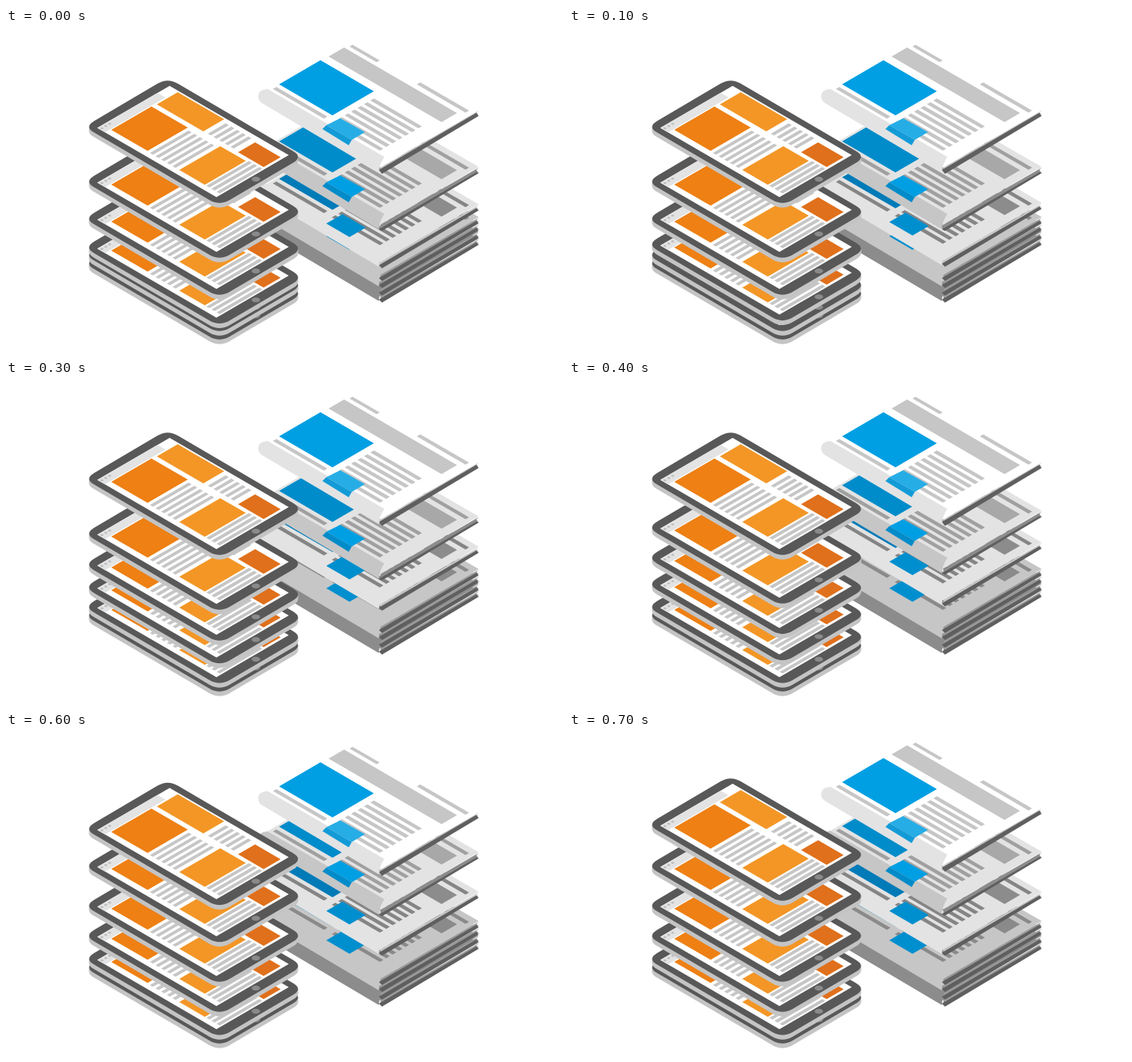
Write an HTML page with a canvas that moves like this. It is 720 px wide and 420 px high and loops after 0.8 s.

```html
<!DOCTYPE html>
<html lang="en">
<head>
<meta charset="utf-8">
<title>Tablets and newspapers</title>
<style>
html, body { margin: 0; width: 100%; height: 100%; overflow: hidden; background: #fff; }
canvas { display: block; }
</style>
</head>
<body>
<canvas id="stage" width="720" height="420"></canvas>
<script>
const ctx = document.getElementById('stage').getContext('2d');
const SLOPE = 0.582;
const STEP = 100;
const STEPS = 8;

// Each piece rises once per loop; times count in steps.
const tablets = [
  { low: 0, high: -16, start: 5, end: 9 },
  { low: 71, high: 45.5, start: 3, end: 5.7 },
  { low: 119, high: 97, start: 1.5, end: 5.2 },
  { low: 157, high: 136, start: -0.5, end: 4.5 }
];
const papers = [
  { low: 0, high: -16, start: 5, end: 9,
    page: '#ffffff', fold: '#e3e3e3', edge: '#c6c6c6', depth: 3, bar: '#c6c6c6',
    line: '#c6c6c6', photo: '#009fe3', box: '#27ade6', boxFold: '#139bd7' },
  { low: 74, high: 49, start: 2, end: 6.5,
    page: '#e3e3e3', fold: '#c6c6c6', edge: '#8c8c8c', depth: 6, bar: '#a8a8a8',
    line: '#a0a0a0', photo: '#008cca', box: '#009fe3', boxFold: '#008bc9' },
  { low: 122.5, high: 101, start: 0, end: 5.4,
    page: '#e3e3e3', fold: '#e3e3e3', edge: '#c6c6c6', depth: 4, bar: '#8c8c8c',
    line: '#858585', photo: '#007bb8', box: '#008fce' }
];
const still = { page: '#c6c6c6', fold: '#c6c6c6', edge: '#9a9a9a', depth: 4, bar: '#8a8a8a',
  line: '#8a8a8a', photo: '#007bb8', box: '#008fce' };
const stack = { page: '#8c8c8c', fold: '#8c8c8c', edge: '#9a9a9a', depth: 4 };

function lift({ low, high, start, end }, step) {
  const t = Math.min(1, Math.max(0, (step - start) / (end - start)));
  return low + (high - low) * t * t * (3 - 2 * t);
}

function poly(color, ...pts) {
  ctx.fillStyle = color;
  ctx.beginPath();
  for (let i = 0; i < pts.length; i += 2) ctx.lineTo(pts[i], pts[i + 1]);
  ctx.fill();
}

// Isometric block from its left corner: a runs down-right, b runs up-right.
function block(color, x, y, a, b) {
  poly(color, x, y, x + b, y - b * SLOPE,
    x + a + b, y + (a - b) * SLOPE, x + a, y + a * SLOPE);
}

function rows(color, count, x, y, dx, a, b) {
  for (let i = 0; i < count; i++) {
    block(color, x + dx * i, y + Math.abs(dx) * SLOPE * i, a, b);
  }
}

function dot(color, x, y, rx, ry) {
  ctx.fillStyle = color;
  ctx.beginPath();
  ctx.ellipse(x, y, rx, ry, 0, 0, Math.PI * 2);
  ctx.fill();
}

function at(dy, draw) {
  ctx.save();
  ctx.translate(0, dy);
  draw();
  ctx.restore();
}

function shell(color) {
  ctx.fillStyle = color;
  ctx.beginPath();
  ctx.moveTo(114, 120.4);
  ctx.lineTo(196, 72.1);
  ctx.quadraticCurveTo(209, 64.5, 222, 72.1);
  ctx.lineTo(371, 159.4);
  ctx.quadraticCurveTo(384, 167, 371, 174.7);
  ctx.lineTo(289, 222.9);
  ctx.quadraticCurveTo(276, 230.5, 263, 222.9);
  ctx.lineTo(114, 135.6);
  ctx.quadraticCurveTo(101, 128, 114, 120.4);
  ctx.fill();
}

function tablet() {
  for (let d = 6; d > 0; d--) at(d, () => shell('#c4c4c4'));
  shell('#585858');
  block('#ffffff', 118, 129.5, 154, 93.5);
  block('#e3e3e3', 118, 129.5, 10, 78);
  for (let i = 0; i < 3; i++) dot('#bdbdbd', 124 + 5 * i, 130 - 2.9 * i, 1.9, 1.3);
  block('#ee8014', 136, 132, 47, 52);
  block('#f39626', 195, 99, 60, 27);
  block('#f39626', 224, 184, 33, 53);
  block('#e0701b', 300, 161, 33, 22);
  rows('#c6c6c6', 5, 186, 162, 7.3, 4, 50);
  rows('#c6c6c6', 5, 261, 137, 7.3, 4, 23);
  rows('#c6c6c6', 3, 259, 204.5, 6.6, 4, 55);
  dot('#8a8a8a', 323, 196, 5.5, 3.2);
}

function sheets({ page, fold, edge, depth }) {
  poly(page, 338, 79, 450, 13, 611, 106, 484, 181);
  poly(edge, 484, 181, 611, 107, 608, 110, 611, 108 + depth, 484, 182 + depth);
  poly('#5f5f5f', 482, 181 + depth, 608, 107 + depth, 611, 114, 486, 189);
  ctx.fillStyle = fold;
  ctx.beginPath();
  ctx.moveTo(338, 79);
  ctx.quadraticCurveTo(326, 80, 326, 88);
  ctx.quadraticCurveTo(326, 95, 332, 98);
  ctx.lineTo(482, 187);
  ctx.quadraticCurveTo(482, 178, 489, 167);
  ctx.fill();
}

function paper(p) {
  sheets(p);
  block(p.bar, 417, 37, 146, 20);
  block(p.line, 444, 24, 35, 4);
  block(p.line, 531, 73, 63, 4.5);
  block(p.photo, 353, 73, 69, 53.5);
  block(p.line, 345, 79, 66, 4.5);
  rows(p.line, 7, 471, 94, -8.3, 62, 4.6);
  if (p.boxFold) {
    poly(p.box, 432, 117, 464, 135, 447, 145, 414, 126);
    poly(p.boxFold, 414, 126, 447, 145, 443, 152, 409, 131);
  } else {
    block(p.box, 414, 131, 30, 21);
  }
}

function render(step) {
  ctx.fillStyle = '#fff';
  ctx.fillRect(0, 0, 720, 420);

  at(167, () => sheets(stack));
  at(158, () => sheets(stack));
  at(148, () => sheets(still));
  at(139, () => paper(still));
  for (const p of [...papers].reverse()) at(lift(p, step), () => paper(p));

  at(177, tablet);
  at(166, tablet);
  for (const t of [...tablets].reverse()) at(lift(t, step), tablet);
}

function tick() {
  render(Math.floor(performance.now() / STEP) % STEPS);
  requestAnimationFrame(tick);
}
tick();
</script>
</body>
</html>
```
